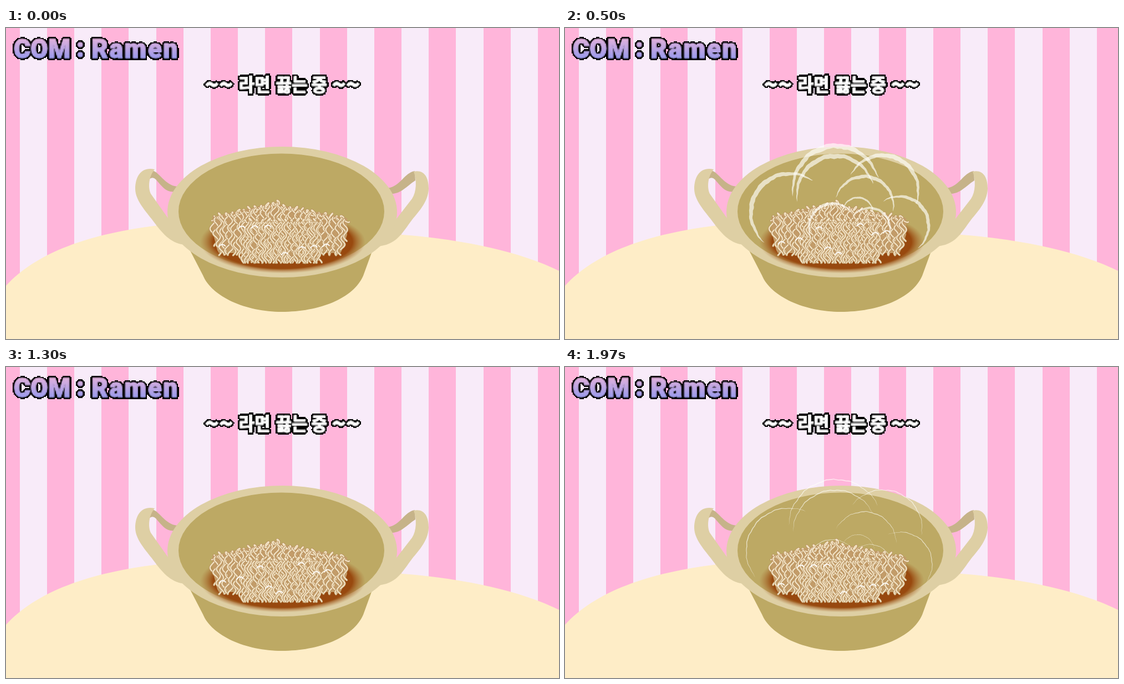
Recreate the animation shown at these times as an HTML page with a canvas. Size 997 px wide and 561 px high, loop 2.01 s.

```html
<!DOCTYPE html>
<html lang="ko">
<head>
<meta charset="utf-8">
<title>Ramen</title>
<style>
html, body { margin: 0; width: 100%; height: 100%; overflow: hidden; background: #feedc7; }
canvas { display: block; }
</style>
</head>
<body>
<canvas id="stage" width="997" height="561"></canvas>
<script>
const W = 997, H = 561, LOOP = 2010, BOIL_LOOP = 885, PUFF_LIFE = 760;
const TAU = Math.PI * 2, DEG = Math.PI / 180;
const view = document.getElementById('stage').getContext('2d');

function layer(w, h) {
  const c = document.createElement('canvas');
  c.width = w;
  c.height = h;
  return c.getContext('2d', { willReadFrequently: true });
}

function seeded(seed) {
  return () => (seed = seed * 16807 % 2147483647) / 2147483647;
}

function fillPath(g, color, d) {
  g.fillStyle = color;
  g.fill(new Path2D(d));
}

function oval(g, color, x, y, rx, ry) {
  g.fillStyle = color;
  g.beginPath();
  g.ellipse(x, y, rx, ry, 0, 0, TAU);
  g.fill();
}

function drawRoom(g) {
  g.fillStyle = '#f8ebf9';
  g.fillRect(0, 0, W, H);
  g.fillStyle = '#ffb5da';
  for (let x = -24.4; x < W; x += 98.33) g.fillRect(Math.round(x), 0, 49, H);
  fillPath(g, '#feedc7', 'M0 465C55 405 150 371 275 356C400 342 600 356 715 373C830 382 930 405 997 438V561H0Z');
}

function drawPot(g) {
  const rim = '#decfa4', inside = '#bda964', shade = '#c6b389';
  fillPath(g, shade, 'M259 257C275 254 284 284 309 286L306 295C290 298 282 287 270 273Q264 267 257 274Z');
  fillPath(g, shade, 'M737 258C718 261 712 285 688 289L692 299C712 300 720 287 738 275Z');
  fillPath(g, rim, 'M268 255C246 250 233 265 233 291C234 310 248 326 263 345C281 369 295 388 322 391L306 352L297 350L261 299C256 288 257 268 268 255Z');
  fillPath(g, rim, 'M735 259C753 255 762 268 762 290C761 313 746 329 732 346C714 370 704 392 668 394L690 352L701 348L732 308C740 296 741 274 735 259Z');
  fillPath(g, inside, 'M326 390L355 446C371 485 433 512 497 512C565 512 626 488 644 447L664 392Z');
  oval(g, rim, 498, 332, 207, 118);
  oval(g, inside, 496.5, 331, 185.5, 104.5);

  g.save();
  g.translate(499, 386);
  g.scale(1, .38);
  const broth = g.createRadialGradient(0, 0, 80, 0, 0, 149);
  broth.addColorStop(0, '#96460e');
  broth.addColorStop(.66, '#98490f');
  broth.addColorStop(1, 'rgba(170,110,50,0)');
  g.fillStyle = broth;
  g.fillRect(-160, -160, 320, 320);
  g.restore();
}

function strand(g, points) {
  const path = new Path2D();
  points.forEach(p => path.lineTo(...p));
  for (const [color, width] of [['#ad8552', 3.9], ['#dec49b', 2.9], ['#f5e8cd', 1.4]]) {
    g.strokeStyle = color;
    g.lineWidth = width;
    g.stroke(path);
  }
}

// Outline of the noodle block: a peak near the middle, a lower front slab
const noodleTop = x => x < 495 ? 338 - .23 * (x - 370) : 317 + .2 * (x - 500);
const noodleBottom = x => Math.min(Math.abs(x - 495) < 71 ? 425 : 411, 362 + 4 * (x - 370), 372 + 3 * (617 - x));

function drawNoodles(g) {
  const random = seeded(7);
  g.lineCap = g.lineJoin = 'round';
  g.fillStyle = '#c39c69';
  g.beginPath();
  for (let x = 372; x <= 615; x += 3) g.lineTo(x, noodleTop(x) + 3);
  for (let x = 615; x >= 372; x -= 3) g.lineTo(x, noodleBottom(x) - 5);
  g.fill();

  const curl = (from, to, edge) => {
    const points = [];
    for (let x = from, a = 0; x < to; x += .5, a += .3) {
      const size = 4.5 + 1.5 * Math.sin(x * .23);
      points.push([x + size * Math.sin(a), edge(x) + 6 + size * Math.cos(a + Math.sin(x * .11))]);
    }
    strand(g, points);
  };
  const columns = (from, to, top) => {
    for (let x = from; x < to; x += 5.2) {
      const phase = random() * TAU, wave = 3.6 + random(), points = [];
      for (let y = top(x); y < noodleBottom(x) - 1; y += 1.5) {
        points.push([x + 4 * Math.sin(y / wave + phase) + Math.sin(y / 9 + x), y]);
      }
      strand(g, points);
    }
  };
  curl(371, 615, noodleTop);
  columns(373, 615, x => noodleTop(x) + 6);
  curl(426, 570, () => 343);
  columns(428, 566, () => 350);
}

// Hard-edged lettering: drawn at half size, then doubled without smoothing
function drawLettering(g) {
  const small = layer(330, 70);
  small.scale(.5, .5);
  small.textAlign = 'center';
  small.lineJoin = 'round';
  const word = (text, x, y, font, fill, spacing = 0) => {
    small.font = font;
    small.letterSpacing = spacing + 'px';
    small.strokeStyle = '#000';
    small.lineWidth = 7.5;
    small.strokeText(text, x, y);
    small.strokeStyle = small.fillStyle = fill;
    small.lineWidth = 1.6;
    small.strokeText(text, x, y);
    small.fillText(text, x, y);
  };

  const lilac = small.createLinearGradient(0, 20, 0, 55);
  lilac.addColorStop(0, '#dfb0dc');
  lilac.addColorStop(1, '#9a9aec');
  const latin = '900 46px Roboto, Inter, sans-serif';
  word('COM', 65, 54, latin, lilac);
  word(':', 134, 52, latin, lilac);
  word('Ramen', 233, 54, latin, lilac, 2.5);

  const korean = size => `900 ${size}px "Noto Sans CJK KR", "Noto Sans CJK", sans-serif`;
  word('라면', 448, 114, korean(31), '#fff');
  word('끓는', 515, 114, korean(31), '#fff');
  word('중', 565, 114, korean(31), '#fff');
  for (const x of [384, 613]) word('~~', x, 117, korean(43), '#fff');

  const image = small.getImageData(0, 0, 330, 70);
  for (let i = 3; i < image.data.length; i += 4) image.data[i] = image.data[i] > 110 ? 255 : 0;
  small.putImageData(image, 0, 0);
  g.imageSmoothingEnabled = false;
  g.drawImage(small.canvas, 0, 0, 660, 140);
}

// Steam puffs (x, y, radius), each thickest on the side away from the broth
const puffs = [
  [403, 331, 67], [488, 287, 74], [487, 297, 66], [574, 291, 61], [540, 318, 50],
  [605, 355, 50], [482, 358, 41], [528, 332, 26], [550, 360, 35]
];

function drawSteam(age) {
  if (age <= 0 || age >= PUFF_LIFE) return;
  const grow = 1.35 * (1 - Math.exp(-(age + 150) / 380));
  const thick = Math.max(.02, .85 * Math.max(0, 1 - age / 640) ** 1.7);
  const reach = Math.min(105, 135 - age * .1);
  const alpha = .65 * Math.min(1, age / 90, (PUFF_LIFE - age) / 130);
  view.fillStyle = `rgba(255,255,250,${alpha})`;
  puffs.forEach(([x, y, size], k) => {
    const r = size * grow, dir = Math.atan2(y - 420, x - 515), outer = [], inner = [];
    for (let a = -reach; a <= reach; a += 3) {
      const angle = dir + a * DEG;
      const edge = r * (1 + .008 * Math.sin(a * .21 + k) + .005 * Math.sin(a * .63 + k * 2));
      const ragged = 1 + .07 * Math.sin(a * .17 + k * 3) + .04 * Math.sin(a * .53 + k);
      const taper = Math.max(0, Math.cos(a / reach * Math.PI / 2)) ** .7;
      const hole = edge - r * thick * taper * ragged;
      outer.push([x + edge * Math.cos(angle), y + edge * Math.sin(angle)]);
      inner.unshift([x + hole * Math.cos(angle), y + hole * Math.sin(angle)]);
    }
    view.beginPath();
    outer.concat(inner).forEach(p => view.lineTo(...p));
    view.fill();
  });
}

function drawBubble(x, y) {
  view.lineWidth = 1;
  view.strokeStyle = 'rgba(255,245,220,.5)';
  view.setLineDash([1.5, 3]);
  view.beginPath();
  view.arc(x, y, 7, 0, TAU);
  view.stroke();
  view.setLineDash([]);
  view.lineWidth = 1.8;
  view.strokeStyle = '#fff';
  view.beginPath();
  view.arc(x, y + 1, 6.5, -165 * DEG, -30 * DEG);
  view.stroke();
}

function drawPop(x, y) {
  view.lineWidth = 1.3;
  view.strokeStyle = 'rgba(255,255,255,.9)';
  view.beginPath();
  for (let a = -170; a <= -10; a += 40) {
    const c = Math.cos(a * DEG), s = Math.sin(a * DEG);
    view.moveTo(x + 3 * c, y + 3 * s);
    view.lineTo(x + 7 * c, y + 6 * s);
  }
  view.stroke();
}

// Each batch of bubbles shows for half its time, then pops a little higher
function drawBoil(t) {
  const span = BOIL_LOOP / 2.4, batch = Math.floor(t / span);
  const popping = t % span > span * .55;
  const random = seeded(4211 * (batch + 3));
  for (let i = 0; i < 8; i++) {
    const x = 388 + 26 * i + 20 * random();
    const y = 356 + 56 * random();
    if (popping) drawPop(x, y - 21);
    else drawBubble(x, y);
  }
}

const scene = layer(W, H);
[drawRoom, drawPot, drawNoodles, drawLettering].forEach(draw => draw(scene));

const start = performance.now();
function frame() {
  const t = (performance.now() - start) % LOOP;
  view.drawImage(scene.canvas, 0, 0);
  drawBoil(t % BOIL_LOOP);
  drawSteam(t - 60);
  drawSteam(t - 1400);
  requestAnimationFrame(frame);
}
frame();
</script>
</body>
</html>
```
